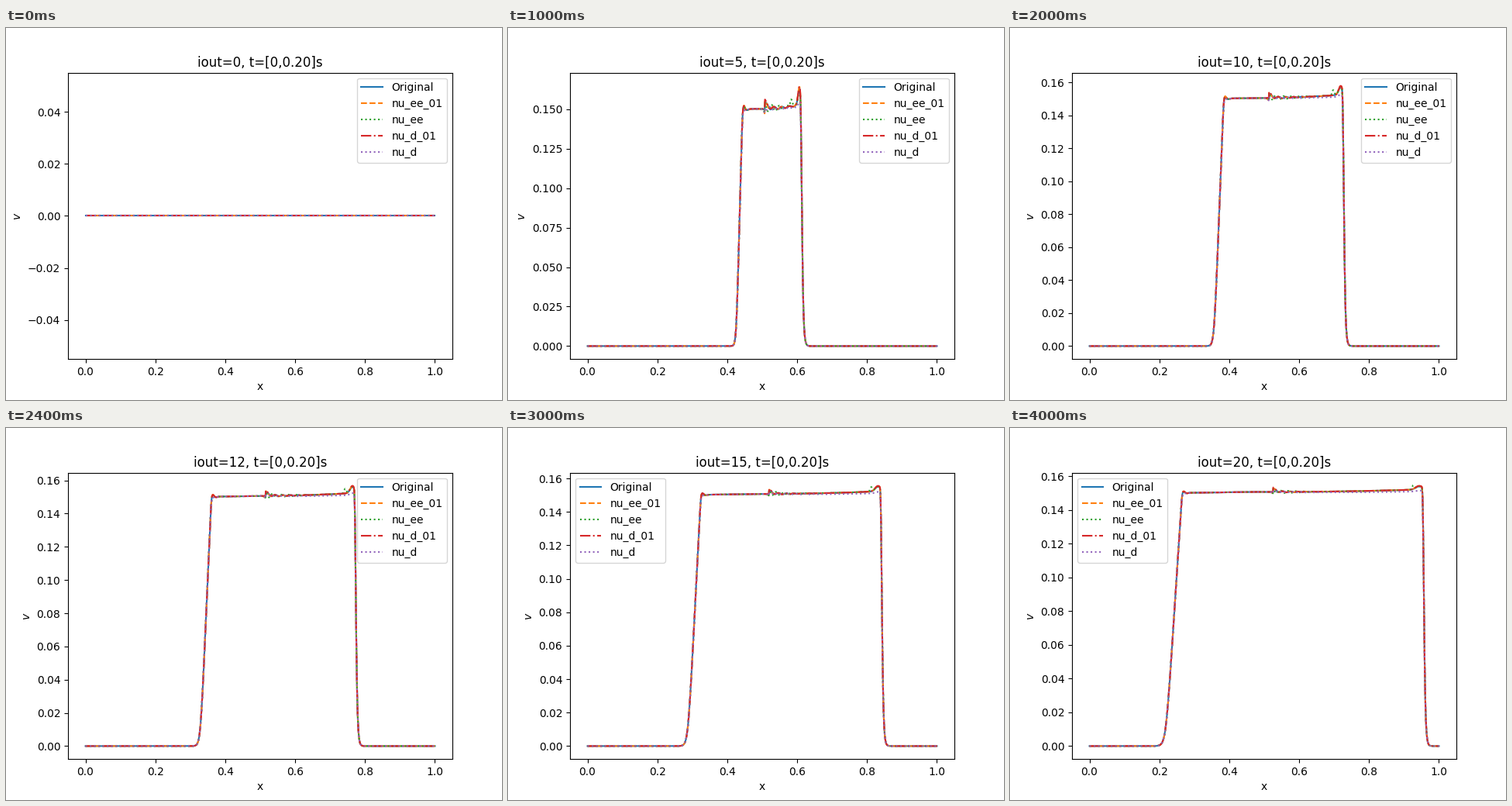
Animation, 640 px wide and 480 px high, one loop 4200 ms. Source, as a matplotlib script:

```python
import numpy as np
import matplotlib.pyplot as plt
from matplotlib.animation import FuncAnimation

STEPS = 21
INTERVAL = 200
LEGEND_SWITCH = 13
x = np.linspace(0, 1, 1001)

# label, line style, left overshoot, contact jump, contact dip, ripple,
# ripple phase, shock spike, level shift behind the shock
SERIES = [
    ("Original", "-", 0.8, 0.70, 0.3, 0.25, 0.0, 0.85, 0.0),
    ("nu_ee_01", "--", 1.0, 0.75, 1.0, 0.25, 0.6, 0.98, 0.0),
    ("nu_ee", ":", 0.6, 0.45, 0.8, 0.50, 2.2, 0.85, 0.0),
    ("nu_d_01", "-.", 0.9, 1.00, 0.0, 0.20, 0.3, 1.00, 0.0),
    ("nu_d", ":", -0.4, 0.20, 0.9, 0.25, 3.4, 0.25, -0.0012),
]


def softplus(d, width):
    return width * np.logaddexp(0, d / width)


def bell(d, width):
    return np.exp(-0.5 * (d / width) ** 2)


def peak_height(n):
    return 0.151 + 0.07 / n


def velocity(n, over, jump, dip, ripple, phase, spike, shift):
    """Velocity between a rarefaction fan on the left and a shock on the right."""
    if n == 0:
        return np.zeros_like(x)
    head, tail = 0.495 - 0.01385 * n, 0.503 - 0.0119 * n
    contact = 0.501 + 0.00125 * n
    shock = 0.4985 + 0.0229 * n

    fan = softplus(x - head, 0.0015 + 0.00018 * n) - softplus(x - tail, 0.0012)
    fan /= tail - head
    front = 1 - np.exp(-np.exp(-np.clip((x - shock) / 0.0028, -6, 300)))

    # plateau, rising slightly towards the shock
    reach = np.clip((x - contact) / (shock - contact), 0, 1)
    rise = 0.0012 + 0.006 / n
    level = 0.1502 + 0.0006 * np.clip((x - tail) / 0.2, 0, 1) + rise * reach ** 2
    level += shift * reach

    # overshoot and small dip after the fan
    swing = 0.0006 + 0.0105 / n
    level += over * swing * bell(x - tail - 0.0035, 0.0025 + 0.0001 * n)
    level -= 0.35 * abs(over) * swing * bell(x - tail - 0.013, 0.004)

    # jump and decaying ripple at the contact
    size = min(0.0014 + 0.022 / n, 0.012)
    ahead = np.clip(x - contact, 0, None)
    behind = np.clip(contact - x, 0, None)
    level += np.where(x >= contact,
                      jump * size * np.exp(-ahead / 0.008)
                      + ripple * size * np.exp(-ahead / 0.06)
                      * np.sin(2 * np.pi * ahead / 0.022 + phase),
                      -dip * 0.55 * size * np.exp(-behind / 0.004))
    if phase == 2.2:
        level += 0.9 * size * bell(x - shock + 0.03, 0.003) * (n > 2)

    # spike just behind the shock
    crest = shock - 0.004 - 0.00045 * n
    height = peak_height(n) - 0.1508 - rise
    level += spike * height * bell(x - crest, 0.002 + 0.0004 * n)
    return level * fan * front


fig, ax = plt.subplots(figsize=(6.4, 4.8), dpi=100)


def draw(n):
    ax.clear()
    for label, style, *shape in SERIES:
        ax.plot(x, velocity(n, *shape), style, label=label)
    if n:
        top = peak_height(n)
        ax.set_ylim(-0.05 * top, 1.05 * top)
    ax.set_title(f"iout={n}, t=[0,0.20]s")
    ax.set_xlabel("x")
    ax.set_ylabel("$v$")
    ax.legend(loc="upper right" if n < LEGEND_SWITCH else "upper left")
    return ax.lines


anim = FuncAnimation(fig, draw, frames=STEPS, interval=INTERVAL, repeat=True)
plt.show()
```
